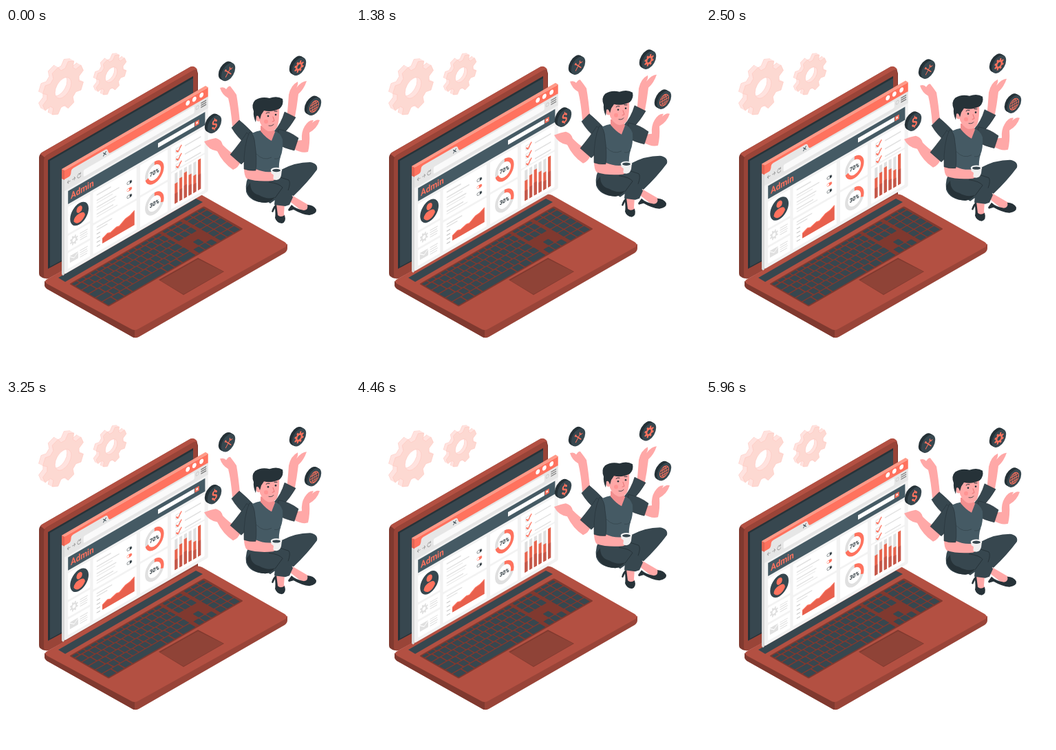
These frames come from a looping animation (500 by 500 pixels, 6000 ms). An HTML page:

```html
<!DOCTYPE html>
<html lang="en">
<head>
<meta charset="utf-8">
<title>Admin dashboard</title>
<style>
html, body { margin: 0; width: 100%; height: 100%; overflow: hidden; background: #fff; }
svg { display: block; width: 100%; height: 100%; }
text { font-family: Roboto, "Open Sans", sans-serif; font-weight: 700; }
</style>
</head>
<body>
<svg viewBox="0 0 500 500">
  <g id="gears"></g>

  <g id="laptop">
    <path d="M48 189Q48 184 52 181L267 57Q272 54 277 59L279 66V247L62 363Q58 365 53 363L50 361Q48 360 48 356Z" fill="#80392f"/>
    <path d="M50 183L52 181L267 57Q272 54 276 58L278 61Q275 60 272 62L59 185L56 188Z" fill="#b35042"/>
    <path d="M55 193Q55 188 59 185L271 62Q278 59 278 66V245L62 364Q55 366 55 359Z" fill="#994438"/>
    <path d="M61 192L272 70V237L61 350Z" fill="#263238"/>
    <path d="M64 193L272 73V232L64 347Z" fill="#37474f"/>
    <path d="M56 368V374Q57 378 61 380L182 448Q187 452 193 449L405 327Q409 324 409 320V314L187 436Z" fill="#994438"/>
    <path d="M56 368V374Q57 378 61 380L182 448Q185 450 187 450V436Z" fill="#80392f"/>
    <path d="M60 365L274 243Q279 240 285 243L405 311Q411 315 405 319L193 437Q187 441 181 437L60 372Q54 368 60 365Z" fill="#b35042"/>
    <path d="M76 363L276 248L286 253L86 369Z" fill="#37474f"/>
    <g id="keyboard" transform="matrix(.866 -.5 .866 .5 92 372)"></g>
    <path d="M222 366L279 334L317 354L258 388Z" fill="#80392f"/>
    <path d="M224 367L279 336L316 354L258 387Z" fill="#8f4337"/>
  </g>

  <g id="panel">
    <path d="M81 205L290 84L294 86.5L85 208Z" fill="#ff9a88"/>
    <path d="M81 205L85 207V358L83 360L81 358Z" fill="#d8d8d8"/>
    <path d="M81 205L85 207V221L81 219Z" fill="#e56654"/>
    <g id="face" transform="matrix(.866 -.5 0 1 85 207)"></g>
  </g>

  <g id="woman">
    <g fill="#ffa8a7">
      <path d="M311 87Q317 85 320 89Q325 82 327 86Q331 91 335 97Q338 115 340 137L329 143Q327 118 323 102Q314 97 311 87Z"/>
      <path d="M408 134Q410 112 411 97Q414 83 424 78Q425 82 422 87Q430 77 437 77Q433 89 425 96Q423 114 419 134Z"/>
      <path d="M288 165Q298 161 305 160Q313 162 315 170Q325 180 332 184L341 194Q338 203 330 206Q315 196 307 179Q294 177 288 165Z"/>
      <path d="M418 164L430 163Q429 151 434 143Q440 133 447 134L445 138Q451 132 456 134Q452 146 441 152Q442 168 439 180Q430 183 417 175Z"/>
    </g>
    <g fill="#37474f" stroke="#263238" stroke-width=".6">
      <path d="M328 145L339 134Q350 143 362 156L350 170Q336 159 328 145Z"/>
      <path d="M405 122L421 130Q413 144 402 155L390 150Q400 139 405 122Z"/>
      <path d="M326 184L342 198Q354 188 362 164L350 152Q341 166 326 184Z"/>
      <path d="M396 147Q412 150 425 160L419 178Q405 175 393 168Z"/>
    </g>
    <path d="M361 207L400 206Q420 195 442 195Q454 197 452 206Q438 225 418 244L405 240L384 255L365 242Z" fill="#37474f"/>
    <g fill="#ffa8a7">
      <path d="M391 252L405 255L404 270Q407 276 402 277L394 273Z"/>
      <path d="M410 250L417 244L441 258L440 266L430 266Z"/>
    </g>
    <g fill="#263238">
      <path d="M393 256Q388 259 386 267L388 268L391 262Q392 271 391 276Q393 283 401 284Q408 282 405 272Q399 276 395 272Q394 264 393 256Z"/>
      <path d="M410 264L411 266L418 264Q430 271 441 272Q452 270 451 264Q447 257 438 257Q440 264 433 265Q421 263 415 257Z"/>
    </g>
    <path d="M356 210Q347 222 349 238Q354 253 377 254Q385 253 391 246L390 257L406 259L412 257L417 246Q410 230 403 225Q380 216 356 210Z" fill="#37474f"/>
    <path d="M349 233Q354 253 377 254Q385 253 391 246Q380 250 368 243Q355 240 355 225Z" fill="#263238"/>
    <path d="M382 224Q398 226 402 232L391 247M384 215Q397 215 411 221Q414 225 410 236" fill="none" stroke="#263238"/>
    <path d="M351 158Q358 151 370 149L385 162L390 150Q398 151 402 162Q403 178 399 187Q396 197 397 208L364 213Q352 190 351 158Z" fill="#455a64"/>
    <path d="M364 183Q374 194 386 188M390 190Q396 191 399 187" fill="none" stroke="#37474f" stroke-width=".8"/>
    <path d="M370 142V150Q378 160 386 164L391 151L388 145Z" fill="#f28f8f"/>
    <path d="M369 116L369 137Q373 147 381 150Q390 151 394 144Q398 134 397 114Z" fill="#ffa8a7"/>
    <ellipse cx="367" cy="131" rx="3.6" ry="4.8" fill="#ffa8a7"/>
    <path d="M363 137Q359 128 360 121Q356 111 362 105Q371 99 383 102Q394 98 402 103Q404 111 398 117Q386 123 375 120L371 126Q370 130 369 133Q367 126 364 128Z" fill="#263238"/>
    <g fill="none" stroke="#263238" stroke-linecap="round">
      <path d="M378 124Q380 122 383 123M390 121L394 121"/>
      <path d="M388 129L390 135L387 136" stroke="#e0686a" stroke-width=".8"/>
      <path d="M382 142Q387 143 389 140" stroke-width=".8"/>
    </g>
    <circle cx="381" cy="128" r="1.3" fill="#263238"/>
    <circle cx="392" cy="126" r="1.3" fill="#263238"/>
    <circle cx="378" cy="136" r="3" fill="#ff7f80" opacity=".5"/>
    <path d="M346 203L363 205Q374 210 386 209Q392 207 394 212Q396 219 388 222Q365 224 350 219Q346 215 346 203Z" fill="#ffa8a7"/>
    <path d="M354 151Q361 154 362 170Q365 190 363 207Q354 208 346 205Q345 170 354 151Z" fill="#37474f" stroke="#263238" stroke-width=".6"/>
    <path d="M385 206L386 215Q388 221 393 221Q399 220 400 214L401 206Z" fill="#f0f0f0"/>
    <ellipse cx="393" cy="206.500" rx="8" ry="3.4" fill="#fff" stroke="#e0e0e0" stroke-width=".5"/>
    <ellipse cx="393" cy="207" rx="6" ry="2.2" fill="#37474f"/>
    <path d="M380 213Q386 209 389 214L388 221L380 221Z" fill="#ffa8a7"/>
    <g id="badges"></g>
  </g>
</svg>
<script>
const ORANGE = '#ff725e', DARK = '#37474f', INK = '#263238', GRAY = '#e0e0e0';
const LOOP = 6000;
const $ = id => document.getElementById(id);
const add = (id, markup) => { $(id).innerHTML += markup; };
const iso = (x, y, body) => `<g transform="matrix(.866 -.5 0 1 ${x} ${y})">${body}</g>`;
const rect = (x, y, w, h, fill, r = 0) =>
  `<rect x="${x}" y="${y}" width="${w}" height="${h}" rx="${r}" fill="${fill}"/>`;
const circle = (x, y, r, fill) => `<circle cx="${x}" cy="${y}" r="${r}" fill="${fill}"/>`;
const line = (d, color, width = 1) =>
  `<path d="${d}" fill="none" stroke="${color}" stroke-width="${width}"/>`;

function gearPath(outer, root, hole, teeth = 8) {
  const step = 2 * Math.PI / teeth, points = [];
  for (let i = 0; i < teeth; i++) {
    for (const [part, r] of [[-.33, root], [-.19, outer], [.19, outer], [.33, root]]) {
      const a = (i + .5 + part) * step;
      points.push((r * Math.sin(a)).toFixed(1) + ' ' + (-r * Math.cos(a)).toFixed(1));
    }
  }
  return `M${points.join('L')}ZM${-hole} 0a${hole} ${hole} 0 1 0 ${2 * hole} 0a${hole} ${hole} 0 1 0 ${-2 * hole} 0Z`;
}

// Solid gear: stacked copies form the side, the last one is the face.
function solidGear(x, y, outer, depth) {
  const d = gearPath(outer, outer * .77, outer * .39);
  const copy = (k, fill, edge) => iso(x - k, y - k * .55,
    `<path d="${d}" fill="${fill}" fill-rule="evenodd" stroke="${edge}" stroke-width=".6"/>`);
  let body = copy(depth, '#ffe3df', '#ffc7be');
  for (let k = depth - 1; k > 0; k--) body += copy(k, '#ffe3df', '#ffe3df');
  return body + copy(0, '#fdd9d2', '#ffc7be');
}
add('gears', solidGear(83, 87, 35, 6) + solidGear(153, 68, 26, 4));

function keyboard() {
  const pitch = 10.6;
  let out = rect(0, 0, 226, 66, '#80392f', 2);
  for (let row = 0; row < 6; row++) {
    const b = row ? 8.5 + (row - 1) * 11.4 : 2, h = row ? 9.8 : 4.6;
    const key = (a, w) => rect(a, b, w, h, DARK, 1);
    if (row === 5) {
      for (const [a, w] of [[2, 13], [17, 11], [30, 11], [43, 56], [101, 11], [114, 11], [127, 21]])
        out += key(a, w);
    } else {
      const first = 8 + row * 2.6;
      out += key(2, first);
      let a = 4 + first;
      for (; a < 134; a += pitch) out += key(a, 9);
      out += key(a, Math.max(4, 149 - a));
    }
    for (let i = 0; i < 3; i++) {
      if (row !== 3 && (row !== 4 || i === 1)) out += key(154 + i * pitch, 9);
      out += key(190 + i * 11.4, 9.8);
    }
  }
  return out;
}
add('keyboard', keyboard());

function donut(x, y, share) {
  const r = 13.3, length = 2 * Math.PI * r;
  return `<g fill="none" stroke-width="5"><circle cx="${x}" cy="${y}" r="${r}" stroke="${GRAY}"/>
    <circle cx="${x}" cy="${y}" r="${r}" stroke="${ORANGE}" transform="rotate(-90 ${x} ${y})"
    stroke-dasharray="${share * length} ${length}"/></g>
    <text x="${x}" y="${y + 3}" font-size="8.5" text-anchor="middle" fill="${INK}">${share * 100}%</text>`;
}

function browser() {
  let out = rect(0, 0, 241, 151, '#f2f2f2', 2) + rect(0, 0, 241, 14, ORANGE) + rect(0, 13, 241, 17, '#e6e6e6');
  out += `<path d="M6 14Q11 13 11 8Q11 4 15 4H68Q72 4 73 8Q74 13 79 14Z" fill="#e6e6e6"/>`;
  out += line('M65 7l5 5m0-5l-5 5', DARK);
  for (const x of [207, 218, 230]) out += circle(x, 5.5, 3.4, '#fff');
  out += rect(32, 15.5, 186, 10, '#fafafa', 2);
  out += line('M10 20H5m2-2.5l-2 2.5l2 2.5M13 20h5m-2-2.5l2 2.5l-2 2.5M27 18a3 3 0 1 0 .5 3M27 16v2.5h-2.5', '#9a9a9a', .9);
  out += line('M229 17h9m-9 3h9m-9 3h9', '#777', 1.3) + `<circle cx="223" cy="20" r="2.4" fill="none" stroke="#ccc"/>`;

  out += rect(6, 33, 230, 19, '#455a64');
  out += `<text x="10.5" y="47" font-size="13.2" fill="${ORANGE}">Admin</text>`;
  out += rect(157, 39, 61, 6.5, '#fff') + rect(219, 39, 7, 6.5, ORANGE) + circle(222.5, 42, 1.4, '#fff');

  const cards = [[6, 56, 37, 39], [6, 98, 37, 22], [6, 123, 37, 23], [48, 56, 73, 45], [48, 104, 73, 42],
    [127, 56, 46, 44], [127, 103, 46, 43], [179, 56, 56, 36], [179, 94, 56, 52]];
  for (const [x, y, w, h] of cards) out += rect(x, y, w, h, '#fff', 1);

  out += circle(25, 75.5, 15.5, DARK) + circle(25, 69, 4.8, ORANGE);
  out += `<path d="M15.5 82Q16 75 25 75Q34 75 34.5 82Q31 88 25 88Q19 88 15.5 82Z" fill="${ORANGE}"/>`;
  out += `<path transform="translate(16 109)" d="${gearPath(7, 5, 2.7)}" fill="${GRAY}" fill-rule="evenodd"/>`;
  out += rect(9, 129, 14, 10, GRAY, 1) + line('M9 130l7 5l7-5', '#fff');
  for (const y of [104, 129]) for (let i = 0; i < 4; i++) out += rect(26, y + i * 3.2, 13 - i % 2, 1.2, GRAY);

  out += rect(54, 62, 24, 1.8, GRAY);
  [72, 82, 92].forEach((y, i) => {
    const on = i === 1;
    out += rect(54, y - 2, 38 - i * 5, 1.6, GRAY) + rect(54, y + 2, 27 + i * 4, 1.4, '#ebebeb');
    out += `<rect x="105" y="${y - 2}" width="8" height="4" rx="2" fill="${on ? ORANGE : '#fff'}"
      stroke="${on ? ORANGE : INK}" stroke-width=".5"/>` + circle(on ? 106.8 : 111, y, 1.7, on ? '#fff' : INK);
  });
  out += rect(54, 109, 26, 1.6, GRAY) + rect(54, 113, 18, 1.4, GRAY);
  for (let y = 119; y < 139; y += 6) out += rect(54, y, 6, 1.3, '#c8c8c8');
  const curve = 'M63.5 131L72 127.5L77 129L87 126L92 127L102 121.5L110 120.5L117.5 117';
  out += `<path d="${curve}V138H63.5Z" fill="#e8604d"/>` + line(curve, ORANGE, 1.4);

  out += donut(151, 78.5, .7) + donut(151, 123.5, .3);

  for (const y of [65, 77, 88]) {
    out += `<rect x="187" y="${y - 3}" width="6.5" height="6.5" fill="#fff" stroke="#d5d5d5" stroke-width=".7"/>`;
    out += line(`M187.5 ${y}l3 3l6-7`, ORANGE, 1.8) + rect(202, y - .5, 27, 1.7, GRAY);
  }
  [112, 108, 104, 111, 116, 97].forEach((top, i) => {
    const x = 185 + i * 7.8;
    out += rect(x, 97, 4.8, 44, GRAY) + rect(x, top, 4.8, 141 - top, '#e8664f')
      + rect(x, top + (141 - top) / 2, 4.8, (141 - top) / 2, '#c4584a');
  });
  return out;
}
add('face', browser());

function badge(x, y, icon) {
  let out = '';
  for (let k = 4; k > 0; k--) out += iso(x - k, y - k * .55, circle(0, 0, 11.8, INK));
  return out + iso(x, y, circle(0, 0, 11.8, DARK) + icon);
}
const tools = line('M-4.5 5.5L4 -4M-4 -4L5 5.5', ORANGE, 1.3) + circle(-4.5, -4.5, 1.5, ORANGE)
  + line('M3 -6a2.5 2.5 0 1 0 4 3', ORANGE, 1.3);
const cog = `<path d="${gearPath(8, 5.8, 3)}" fill="${ORANGE}" fill-rule="evenodd"/>`;
const globe = `<circle r="7.5" fill="none" stroke="${ORANGE}"/><ellipse rx="3.5" ry="7.5" fill="none" stroke="${ORANGE}"/>`
  + line('M0 -7.5V7.5M-7.5 0H7.5M-6.5 -3.8H6.5M-6.5 3.8H6.5', ORANGE, .9);
const dollar = `<text y="6.5" font-size="18.5" text-anchor="middle" fill="${ORANGE}">$</text>`;
add('badges', badge(323, 64, tools) + badge(426, 56, cog) + badge(448, 114, globe) + badge(303, 140, dollar));

// Linear rise and fall: 0 at both ends of the period, 1 in the middle.
const triangle = (t, period) => 1 - Math.abs(1 - 2 * (t % period) / period);
const lift = (id, dy) => $(id).setAttribute('transform', `translate(0 ${-dy})`);

function render(t) {
  lift('panel', 9 * triangle(t, LOOP));
  lift('woman', 10 * triangle(t, LOOP / 2));
}

const start = performance.now();
function tick() {
  render((performance.now() - start) % LOOP);
  requestAnimationFrame(tick);
}
render(0);
requestAnimationFrame(tick);
</script>
</body>
</html>
```
